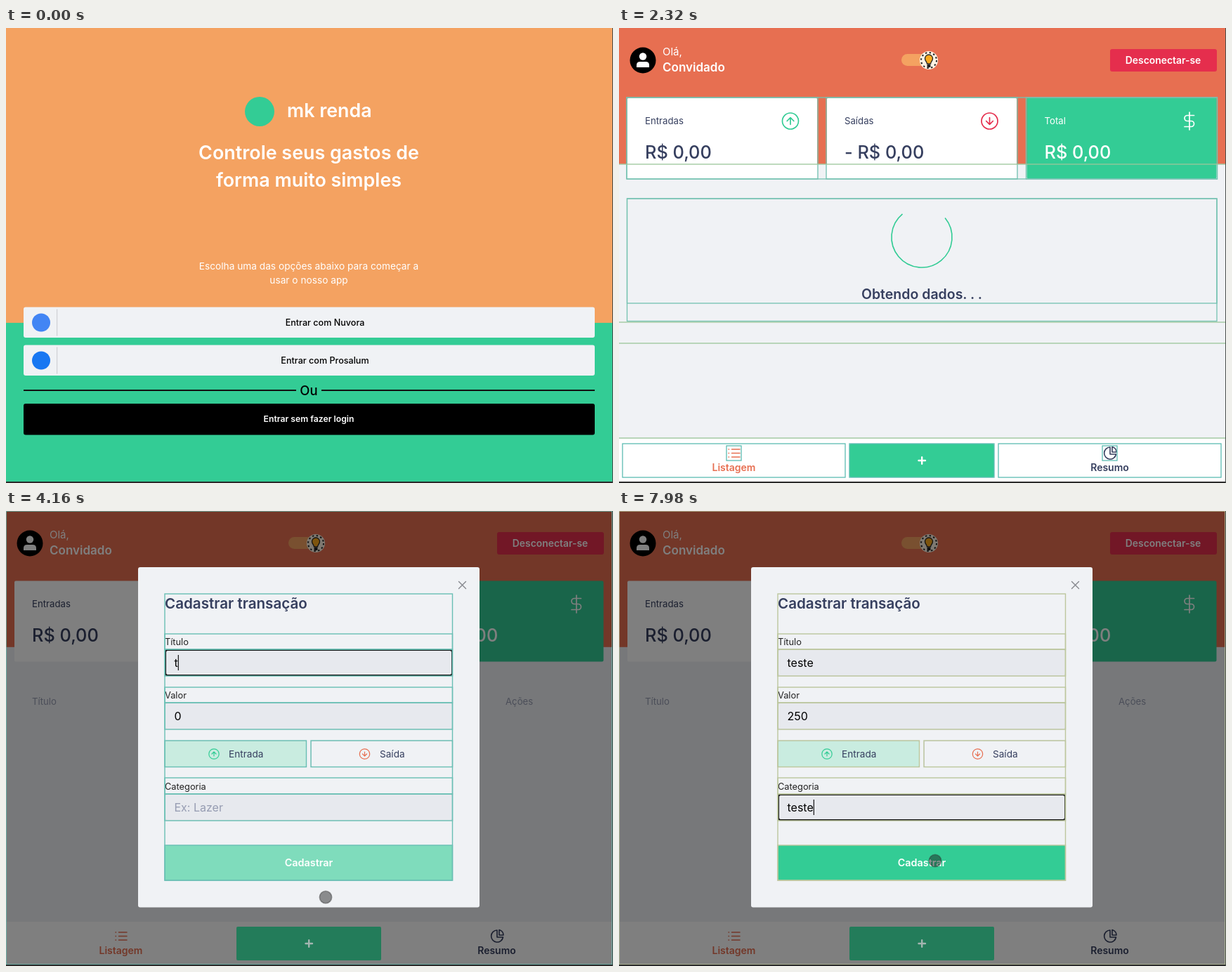
Write an HTML page that moves like this. It is 864x648 px and loops after 8000 ms.

```html
<!DOCTYPE html>
<html lang="pt-BR">
<head>
<meta charset="utf-8">
<title>Controle de gastos</title>
<style>
  html, body { margin: 0; width: 100%; height: 100%; overflow: hidden; }
  svg { display: block; width: 864px; height: 648px; font-family: Inter, "Open Sans", sans-serif; }
</style>
</head>
<body>
<svg id="stage" viewBox="0 0 864 648"></svg>
<script>
const LOOP = 8000;
const AUTH = 880, HOME = 1935, LOADED = 2510, OPEN = 3340, FORM = 4160;
const GREEN = '#33cc95', CORAL = '#e76f51', RED = '#e52e4d', ORANGE = '#f4a261';
const INK = '#363f5f', MIST = '#969cb2', PAPER = '#f0f2f5';
const stage = document.getElementById('stage');
const ruler = document.createElement('canvas').getContext('2d');
ruler.font = '16px Inter, "Open Sans", sans-serif';

const span = (t, from, to) => Math.max(0, Math.min(1, (t - from) / (to - from)));
const easeOut = p => 1 - (1 - p) ** 2.8;
const within = (t, from, to) => t >= from && t < to;

const rect = (x, y, w, h, fill, r = 0, more = '') =>
  `<rect x="${x}" y="${y}" width="${w}" height="${h}" rx="${r}" fill="${fill}" ${more}/>`;
const circle = (x, y, r, fill, more = '') =>
  `<circle cx="${x}" cy="${y}" r="${r}" fill="${fill}" ${more}/>`;
const path = (d, color, width) =>
  `<path d="${d}" fill="none" stroke="${color}" stroke-width="${width}" stroke-linecap="round" stroke-linejoin="round"/>`;
const text = (s, x, y, size, fill, weight = 400, anchor = 'start') =>
  `<text x="${x}" y="${y}" font-size="${size}" fill="${fill}" font-weight="${weight}" text-anchor="${anchor}">${s}</text>`;
const mid = (s, x, y, size, fill, weight) => text(s, x, y, size, fill, weight, 'middle');
const outline = (boxes, color, width) => boxes.map(([x, y, w, h]) =>
  rect(x, y, w, h, 'none', 0, `stroke="${color}" stroke-width="${width}"`)).join('');
const rules = (ys, color, width) => ys.map(y => rect(0, y - width / 2, 863, width, color)).join('');

function arrow(x, y, r, dir, color, width) {
  const a = r * 0.42;
  return circle(x, y, r, 'none', `stroke="${color}" stroke-width="${width}"`) +
    path(`M${x} ${y - a * dir}V${y + a * dir}M${x - a} ${y}L${x} ${y + a * dir}L${x + a} ${y}`, color, width);
}

/* Three-quarter ring that shrinks to 80% halfway through each turn */
function spinner(age, y, color) {
  const turn = age / 750 % 1, scale = 0.8 + 0.4 * Math.abs(turn - 0.5);
  return circle(0, 0, 53.4, 'none', `stroke="${color}" stroke-width="2" pathLength="360"
    stroke-dasharray="270 90" transform="translate(431 ${y}) rotate(${turn * 360 + 135}) scale(${scale})"`);
}

/* Login and authentication */
function login(t) {
  const intro = rect(0, 0, 864, 648, GREEN) + rect(0, 0, 864, 419.9, ORANGE) +
    circle(361, 119, 21, GREEN) +
    text('mk renda', 400, 127, 26.8, '#fff', 600) +
    mid('Controle seus gastos de', 431, 187, 26.9, '#fff', 600) +
    mid('forma muito simples', 431, 226, 26.9, '#fff', 600) +
    mid('Escolha uma das opções abaixo para começar a', 431, 344, 13.7, '#fff') +
    mid('usar o nosso app', 431, 363.5, 13.7, '#fff');
  if (t >= AUTH) {
    return intro + spinner(t - AUTH, 451.3, '#111') +
      mid('Autenticando. . .', 431, 539, 19.5, INK, 600);
  }
  const provider = (y, label, color) => rect(25, y, 813, 43.5, PAPER, 3) +
    circle(50, y + 22, 13, color) + rect(72, y + 3, 1.2, 38, '#cfd0d4') +
    mid(label, 454, y + 26, 12.6, '#000', 500);
  return intro + provider(397.5, 'Entrar com Nuvora', '#4285f4') +
    provider(451.5, 'Entrar com Prosalum', '#1877f2') +
    rect(25, 515, 388, 2, '#111') + rect(449, 515, 389, 2, '#111') +
    mid('Ou', 431, 523, 18.5, '#000', 500) +
    rect(25, 535, 813, 44.5, '#000', 3) +
    mid('Entrar sem fazer login', 431, 561, 12.2, '#fff', 600);
}

/* Main page */
function toggle() {
  const rays = circle(441, 46, 11, 'none', 'stroke="#222" stroke-width="2" stroke-dasharray="2.4 3.4"');
  return rect(402, 37, 42, 17, ORANGE, 8.5) + circle(441, 46, 13, '#fdf3e4') + rays +
    `<path d="M438.5 51C438.5 48 435.5 47 435.5 43.500A5.500 5.500 0 0 1 446.500 43.500C446.500 47 443.500 48 443.500 51Z"
      fill="#fcaa1d" stroke="#222" stroke-width="1.3"/>` + rect(438.5, 52, 5, 4, '#222', 1);
}

function card(x, label, value, fill, labelColor, valueColor, icon) {
  return rect(x, 99.5, 270, 115, fill, 2) + text(label, x + 25, 136.5, 13.2, labelColor) +
    text(value, x + 25, 186, 25.3, valueColor, 500) + icon;
}

function app(t) {
  const dollar = path('M812 120V145M818.500 124.500H809A4 4 0 0 0 809 132.500H814.500A4 4 0 0 1 814.500 140.500H805', '#fff', 1.7);
  const heads = [['Título', 37], ['Valor', 194], ['Categoria', 348], ['Data', 560], ['Ações', 711]];
  const list = [600, 605.5, 611].map(y => path(`M156 ${y}h.5M160.500 ${y}H172`, CORAL, 1.5)).join('');
  return rect(0, 0, 864, 648, PAPER) + rect(0, 0, 863, 193.8, CORAL) +
    circle(34, 46, 18.5, '#000') + circle(34, 40.5, 5.2, '#fff') +
    '<path d="M25 56V53Q25 48 30 48H38Q43 48 43 53V56Z" fill="#fff"/>' +
    text('Olá,', 62, 39, 15, '#fff') + text('Convidado', 62, 61.5, 17, '#fff', 600) +
    toggle() + rect(699, 30, 152, 32, RED, 3) + mid('Desconectar-se', 774.5, 50.5, 13.9, '#fff', 600) +
    card(12, 'Entradas', 'R$ 0,00', '#fff', INK, INK, arrow(244, 132.5, 11.5, -1, GREEN, 1.7)) +
    card(296, 'Saídas', '- R$ 0,00', '#fff', INK, INK, arrow(527.5, 132.5, 11.5, 1, RED, 1.7)) +
    card(580.5, 'Total', 'R$ 0,00', GREEN, '#fff', '#fff', dollar) +
    (t < LOADED
      ? spinner(t - HOME, 298, GREEN) + mid('Obtendo dados. . .', 431, 385.5, 19.5, INK, 600)
      : heads.map(([s, x]) => text(s, x, 276, 13.2, MIST)).join('')) +
    rect(0, 585, 863, 61, '#fff') + list + mid('Listagem', 163.5, 631, 14, CORAL, 600) +
    path('M699 597A8.500 8.500 0 1 0 707.500 607H699ZM702 596.500A8 8 0 0 1 708 604H702Z', INK, 1.6) +
    mid('Resumo', 698.5, 631, 14, INK, 600);
}

function addButton(t) {
  let fill = GREEN, plus = '#fff';
  if (t >= 3060) {
    fill = t < 3450 ? '#218386' : t < FORM ? '#13573c' : '#237c5a';
    plus = '#a3b5b0';
  }
  return rect(328, 592, 206, 48, fill, 2) + path('M426.500 616H436M431.200 611.200V620.800', plus, 2.4);
}

/* Update highlights around the page's boxes */
function pageMarks(loading, color, accent, width) {
  const boxes = [11, 295, 579.5].map(x => [x, 99, 272, 116]);
  boxes.push([11, 99, 840.5, 116], [11.5, 243, 839.5, loading ? 174.5 : 82.5]);
  if (loading) boxes.push([11.5, 243, 839.5, 149]);
  return outline(boxes, color, width) +
    rules([194, 584, ...(loading ? [419, 449] : [356.5])], accent, width);
}
const footerMarks = (color, width) => outline([[5, 592, 317, 48], [328, 592, 206, 48],
  [540, 592, 317, 48], [153, 595, 21, 21], [688, 595, 21, 21]], color, width);

/* Modal form */
const typed = (t, word, times) => word.slice(0, times.filter(at => t >= at).length);

function field(label, y, value, hint, focused) {
  const caret = 239.5 + ruler.measureText(value).width;
  return text(label, 226, y - 6.5, 12.8, '#222') +
    rect(226.5, y + .5, 409, 37, '#e7e9ee', 3, 'stroke="#d7d7dc"') +
    (focused ? rect(227, y + 1, 408, 36, 'none', 3, 'stroke="#111" stroke-width="2"') : '') +
    text(value || hint, 239.5, y + 25, 16, value ? '#000' : MIST) +
    (focused ? rect(caret, y + 8, 1.1, 22, '#000') : '');
}

function formMarks(t) {
  if (!(within(t, FORM, 4960) || within(t, 5380, 6360) || t >= 7100)) return '';
  const color = t < 5630 ? '#69bfb4' : t < 7100 ? '#8fc3a4' : '#bcc79d';
  const rows = [[118, 526], [175, 197], [197, 235], [251, 273], [273, 311], [380, 403], [403, 441], [476, 526]];
  return outline(rows.map(([a, b]) => [226, a, 409.5, b - a])
    .concat([[226, 327, 201.5, 37.5], [434, 327, 201.5, 37.5], [0, 0, 863, 646]]), color, 1.4);
}

function modal(t) {
  const title = typed(t, 'teste', [4160, 4420, 4620, 4690, 4760]);
  const value = typed(t, '250', [5380, 5630, 5760]) || '0';
  const category = typed(t, 'teste', [7100, 7180, 7370, 7570, 7640]);
  const drop = 568 * (1 - easeOut(span(t, OPEN, OPEN + 600)));
  return `<g transform="translate(0 ${drop})">` +
    rect(188, 80, 486, 484.5, PAPER, 3) +
    path('M644.500 100.500L654.500 110.500M654.500 100.500L644.500 110.500', '#85878d', 1.4) +
    text('Cadastrar transação', 226, 139, 20.6, INK, 600) +
    field('Título', 197, title, 'Ex: Video game', t < 4960) +
    field('Valor', 273, value, '', within(t, 4960, 6700)) +
    rect(226.5, 327.5, 201, 37, '#c9ece0', 2, 'stroke="#bcdcd1"') +
    rect(434.5, 327.5, 201, 37, 'none', 2, 'stroke="#d7d7dc"') +
    arrow(296, 346, 7.2, -1, GREEN, 1.2) + text('Entrada', 317, 351, 13.6, INK) +
    arrow(510.5, 346, 7.2, 1, CORAL, 1.2) + text('Saída', 532, 351, 13.6, INK) +
    field('Categoria', 403, category, 'Ex: Lazer', t >= 6700) +
    rect(226, 476, 410, 50, category ? GREEN : '#7fdcbc', 3) +
    mid('Cadastrar', 431, 506, 14.4, '#fff', 600) + formMarks(t) + '</g>';
}

/* Pointer: each leg is start time, end time, from, to */
const legs = [
  [200, 590, 788, 637, 662.5, 557],
  [LOADED, 2920, 560, 658, 451, 604],
  [3900, FORM, 451, 604, 455, 550],
  [4620, 4760, 455, 550, 455, 539],
  [7570, 7980, 455, 539, 450, 498]
];
function pointer(t) {
  const leg = legs.filter(l => t >= l[0]).pop();
  if (!leg || within(t, HOME, LOADED)) return '';
  const [from, to, x0, y0, x1, y1] = leg, p = easeOut(span(t, from, to));
  const pressed = within(t, 740, HOME) || within(t, 3060, 3900);
  return circle(x0 + (x1 - x0) * p, y0 + (y1 - y0) * p, 8.7, '#1c1c1c',
    `fill-opacity="${pressed ? .55 : .48}" stroke="#333" stroke-opacity=".4" stroke-width="1.6"`);
}

function dashboard(t) {
  let s = app(t);
  if (t >= 3060) s += rect(0, 0, 864, 648, '#000', 0, `opacity="${.5 * span(t, 3060, 3300)}"`);
  s += addButton(t);
  if (t < LOADED) s += pageMarks(true, '#74c2b1', '#9cc79a', 1.3) + footerMarks('#5cbcb2', 1.3);
  else if (t < 2920) s += pageMarks(false, '#9cc79a', '#b5cb98', 1.4) + footerMarks('#9cc79a', 1.4);
  else if (within(t, 3060, FORM)) {
    s += pageMarks(false, '#e6e0c2', '#ecd99b', 2.3) + footerMarks('#e9e5cd', 2.2);
    if (t < 3500) s += outline([[397.7, 32.5, 57.6, 27], [697.7, 29.5, 153.8, 33]], '#eeeade', 2.2);
  }
  if (t >= OPEN) s += modal(t);
  if (within(t, OPEN, FORM)) s += pageMarks(false, '#ddd2a0', '#ecd78f', 1.2);
  return s;
}

const start = performance.now();
function draw() {
  const t = (performance.now() - start) % LOOP;
  stage.innerHTML = (t < HOME ? login(t) : dashboard(t)) +
    rect(0, 646, 864, 2, '#2b2b2b') + rect(863, 0, 1, 648, '#4a4f4c') + pointer(t);
  requestAnimationFrame(draw);
}
draw();
</script>
</body>
</html>
```
